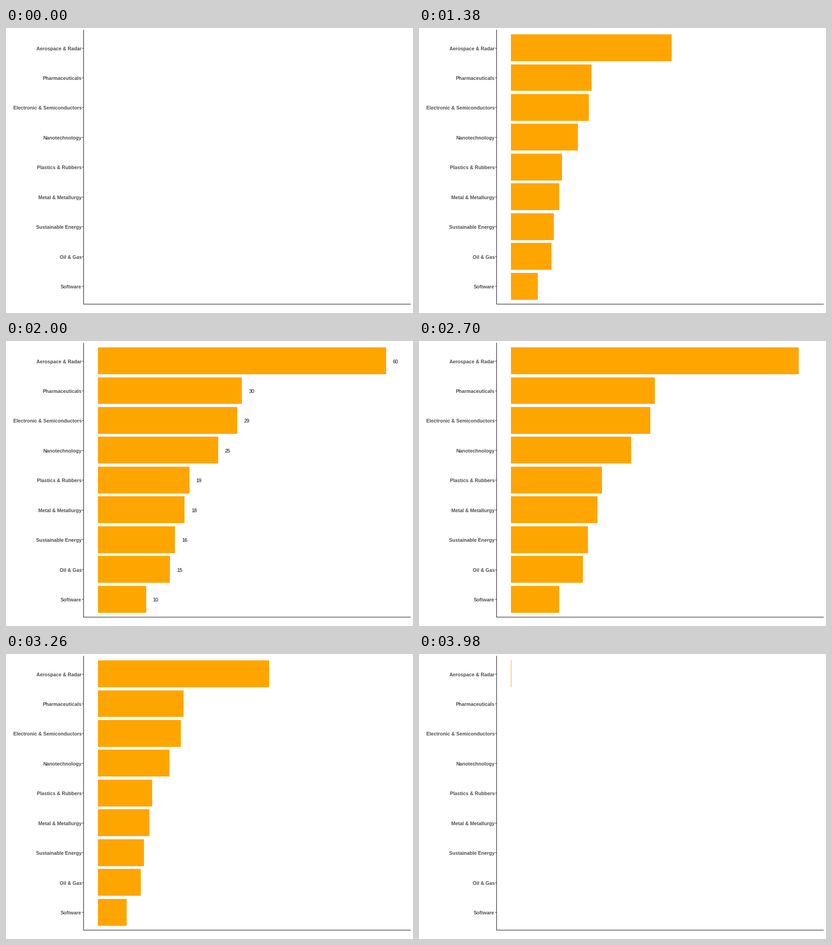
These frames come from a looping animation (894x626 px, 4000 ms). A matplotlib script:

```python
import math

import matplotlib as mpl
import matplotlib.pyplot as plt
from matplotlib.animation import FuncAnimation
from matplotlib.patches import Rectangle

mpl.rcParams.update({
    "toolbar": "None",
    "font.family": "Liberation Sans",
    "text.hinting": "default",
    "text.hinting_factor": 8,
})

WIDTH, HEIGHT, DPI = 894, 626, 72
FRAMES, INTERVAL = 200, 20
GROW_START, GROW_END = 33, 100
SHRINK_START, SHRINK_END = 134, 200

INDUSTRIES = [
    ("Aerospace & Radar", 60),
    ("Pharmaceuticals", 30),
    ("Electronic & Semiconductors", 29),
    ("Nanotechnology", 25),
    ("Plastics & Rubbers", 19),
    ("Metal & Metallurgy", 18),
    ("Sustainable Energy", 16),
    ("Oil & Gas", 15),
    ("Software", 10),
]

ZERO_X, UNIT = 202.25, 632.5 / 60
FIRST_ROW, ROW_STEP = 43.55, 65.44
BAR_HALF = 0.45 * ROW_STEP
AXIS_X, AXIS_RIGHT, AXIS_TOP, AXIS_Y = 170, 889, 4, 606
NAME_SIZE, VALUE_SIZE = 10.7, 11

fig = plt.figure(figsize=(WIDTH / DPI, HEIGHT / DPI), dpi=DPI, facecolor="white")
ax = fig.add_axes([0, 0, 1, 1])
ax.set_xlim(0, WIDTH)
ax.set_ylim(HEIGHT, 0)
ax.axis("off")


def box(left, top, right, bottom, color):
    patch = Rectangle((left, top), right - left, bottom - top,
                      facecolor=color, linewidth=0, antialiased=False)
    return ax.add_patch(patch)


def ease(p):
    return (1 - math.cos(math.pi * p)) / 2


def growth(k):
    """Share of the full bar length at step k."""
    if k <= GROW_START:
        return 0
    if k < GROW_END:
        return ease((k - GROW_START) / (GROW_END - GROW_START))
    if k <= SHRINK_START:
        return 1
    return 1 - ease((k - SHRINK_START) / (SHRINK_END - SHRINK_START))


bars, labels = [], []
for i, (name, value) in enumerate(INDUSTRIES):
    center = FIRST_ROW + i * ROW_STEP
    row = round(center)
    baseline = row + 5
    bars.append(box(round(ZERO_X), round(center - BAR_HALF),
                    round(ZERO_X), round(center + BAR_HALF), "#FFA500"))
    box(AXIS_X - 3, row, AXIS_X, row + 1, "#333333")
    ax.text(166, baseline, name, ha="right", va="baseline",
            size=NAME_SIZE, weight="bold", color="#4D4D4D")
    labels.append(ax.text(ZERO_X + (value + 2) * UNIT, baseline, str(value),
                          ha="center", va="baseline", size=VALUE_SIZE,
                          color="black", visible=False))

box(AXIS_X, AXIS_TOP, AXIS_X + 1, AXIS_Y + 1, "black")
box(AXIS_X, AXIS_Y, AXIS_RIGHT, AXIS_Y + 1, "black")


def update(k):
    share = growth(k)
    for bar, label, (_, value) in zip(bars, labels, INDUSTRIES):
        length = round(ZERO_X + value * UNIT * share) - round(ZERO_X)
        bar.set_width(length)
        bar.set_visible(length > 0)
        label.set_visible(GROW_END <= k <= SHRINK_START)
    return bars + labels


anim = FuncAnimation(fig, update, frames=FRAMES, interval=INTERVAL,
                     repeat=True, repeat_delay=0, blit=False)
plt.show()
```
